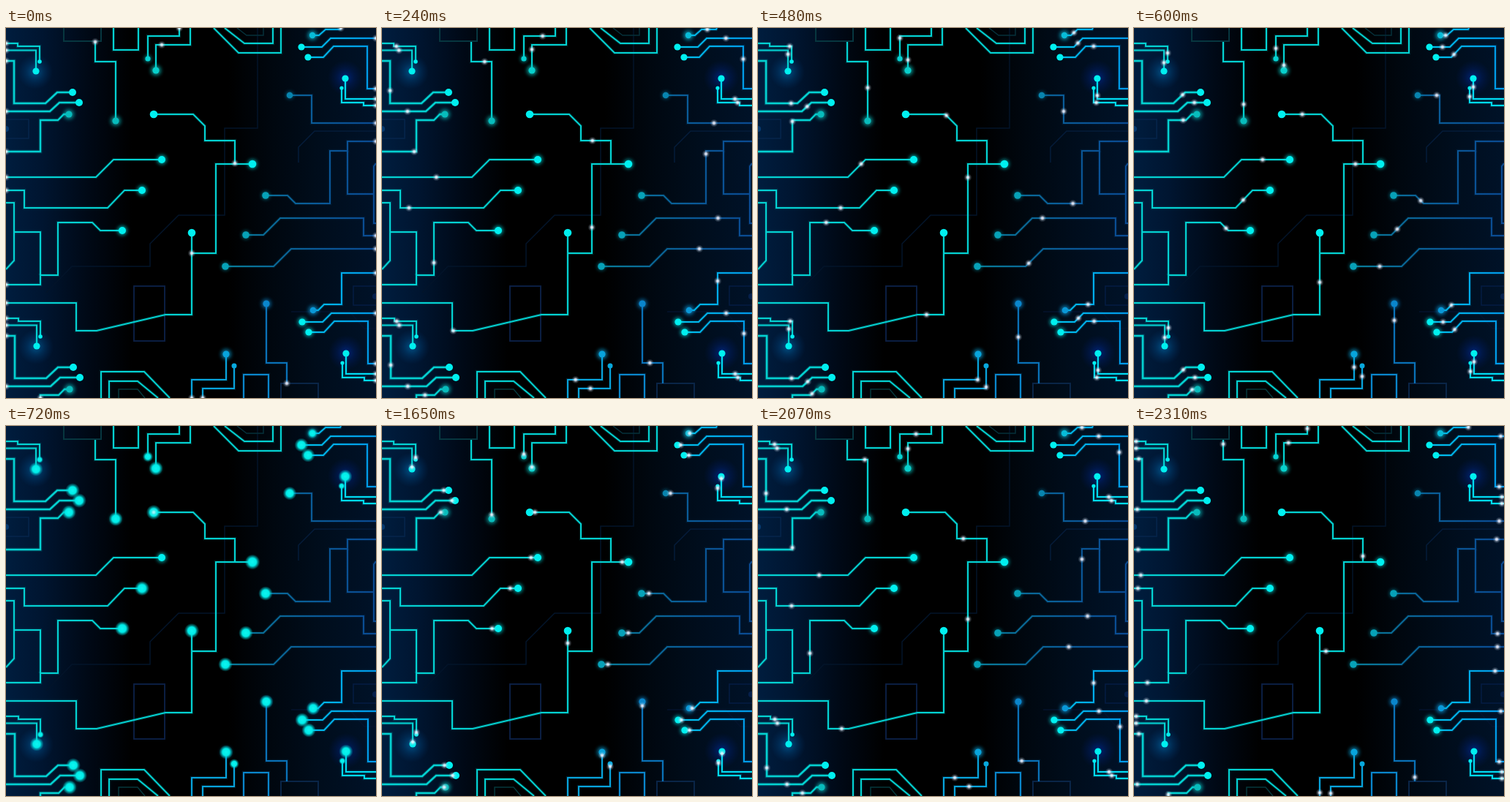
These frames come from a looping animation (506x506 px, 2.34 s). An HTML page:

```html
<!DOCTYPE html>
<html lang="en">
<head>
<meta charset="utf-8">
<title>Circuit</title>
<style>
html, body { margin: 0; width: 100%; height: 100%; overflow: hidden; background: #000; }
svg { display: block; width: 100vw; height: 100vh; }
path { fill: none; }
</style>
</head>
<body>
<svg viewBox="0 0 506 506">
  <defs>
    <linearGradient id="bg">
      <stop offset="0" stop-color="#001d3e"/>
      <stop offset=".1" stop-color="#001530"/>
      <stop offset=".22" stop-color="#000916"/>
      <stop offset=".34" stop-color="#000"/>
      <stop offset=".6" stop-color="#000"/>
      <stop offset=".72" stop-color="#00070f"/>
      <stop offset=".85" stop-color="#000d1c"/>
      <stop offset="1" stop-color="#001228"/>
    </linearGradient>
    <linearGradient id="dim" gradientUnits="userSpaceOnUse" x1="300" x2="506">
      <stop offset="0" stop-color="#087c98"/>
      <stop offset=".6" stop-color="#0a5a98"/>
      <stop offset="1" stop-color="#0a4a92"/>
    </linearGradient>
    <linearGradient id="sky" gradientUnits="userSpaceOnUse" x1="405" x2="506">
      <stop offset="0" stop-color="#00c4ee"/>
      <stop offset="1" stop-color="#0098ea"/>
    </linearGradient>
    <radialGradient id="spark">
      <stop offset="0" stop-color="#fff" stop-opacity=".95"/>
      <stop offset=".3" stop-color="#eef" stop-opacity=".75"/>
      <stop offset=".6" stop-color="#cde" stop-opacity=".28"/>
      <stop offset="1" stop-color="#cde" stop-opacity="0"/>
    </radialGradient>
    <radialGradient id="flare">
      <stop offset="0" stop-color="#10f4f0"/>
      <stop offset=".5" stop-color="#00ece8"/>
      <stop offset=".72" stop-color="#00d8d8" stop-opacity=".5"/>
      <stop offset="1" stop-color="#00c8d0" stop-opacity="0"/>
    </radialGradient>
    <radialGradient id="aura">
      <stop offset="0" stop-color="#0af" stop-opacity=".42"/>
      <stop offset=".5" stop-color="#07c" stop-opacity=".2"/>
      <stop offset="1" stop-color="#05a" stop-opacity="0"/>
    </radialGradient>
    <radialGradient id="auraBlue">
      <stop offset="0" stop-color="#04f" stop-opacity=".4"/>
      <stop offset=".5" stop-color="#03c" stop-opacity=".18"/>
      <stop offset="1" stop-color="#02a" stop-opacity="0"/>
    </radialGradient>
    <filter id="blur" x="-1" y="-1" width="3" height="3"><feGaussianBlur stdDeviation="2.6"/></filter>
  </defs>
  <rect width="506" height="506" fill="url(#bg)"/>
  <g id="base"></g><g id="nodes"></g><g id="flares"></g><g id="sparks"></g>
</svg>
<script>
const CYAN = '#04d2d2', AQUA = '#00f0f0', SKY = 'url(#sky)', DIM = 'url(#dim)', BLUE = '#0a86cc';
const layer = id => document.getElementById(id);
const base = layer('base'), nodes = layer('nodes'), flares = layer('flares'), sparks = layer('sparks');
const movers = [];

function add(parent, tag, attrs) {
  const el = document.createElementNS('http://www.w3.org/2000/svg', tag);
  for (const key in attrs) el.setAttribute(key, attrs[key]);
  return parent.appendChild(el);
}
const dot = (parent, cx, cy, r, fill, more) => add(parent, 'circle', { cx, cy, r, fill, ...more });

function line(d, stroke = CYAN, width = 2) {
  add(base, 'path', { d, stroke, 'stroke-width': width + 2.5, 'stroke-opacity': .16 });
  return add(base, 'path', { d, stroke, 'stroke-width': width });
}
const faint = (d, stroke, width = 1.5) => add(base, 'path', { d, stroke, 'stroke-width': width });

// A line ending in a node, with a spark that runs along it; ease bends its speed.
function wire(d, { color = CYAN, width = 2, node = AQUA, r = 5, glow = 0, ease = 1, flare = r + 5 } = {}) {
  const path = line(d, color, width), len = path.getTotalLength();
  const { x, y } = path.getPointAtLength(len);
  if (glow) dot(nodes, x, y, r + glow, node, { filter: 'url(#blur)', opacity: .65 });
  dot(nodes, x, y, r, node);
  if (flare) dot(flares, x, y, flare, 'url(#flare)');
  movers.push({ path, len, ease, el: dot(sparks, 0, 0, 5.5, 'url(#spark)') });
}

// Soft lights and background circuitry
for (const [x, y, fill] of [[40, 60, 'aura'], [41, 436, 'aura'], [464, 68, 'auraBlue'], [465, 444, 'auraBlue']])
  dot(base, x, y, 24, `url(#${fill})`);
faint('M344 0V137H299V256H236L197 295V326H90L55 362', '#03142a');
faint('M175 353H217V428H175Z', '#0b1e42', 2);
faint('M79 0V18H130V0', '#07363f', 2);
faint('M0 125H31V151H0', '#06264c');
faint('M506 141H422L400 163V184', '#051c3a');
faint('M506 353H475V379H506', '#051c44');
faint('M390 388H470L490 411H506', '#04132c');
faint('M376 506V486H427V506', '#0a2547', 2);
faint('M316 0L329 10H352V0', '#06303a');
faint('M154 506V494H180L190 506', '#06383c');
dot(base, 0, 138, 4, '#063a70');
dot(base, 505, 367, 4, '#06204c');

// Lines without sparks
line('M147 0V30H181V0');
line('M284 0L318 34H376V0');
line('M299 0L326 21H365V0');
line('M252 0V23H213');
line('M130 506V470H189L224 506');
line('M141 506V483H180L208 506');
line('M325 506V474H359V506', BLUE);
line('M0 239H11V318L0 330');
line('M11 279H47V338');
line('M467 168V227H503', DIM);
line('M506 185L503 189V267H506', DIM);

// Corner bundles, repeated lower down with a small shift
for (const [a, b] of [[0, 0], [1, 376]]) {
  const shift = (x, y, rest) => `M${x} ${y + b}` +
    rest.replace(/([HVL])(\d+)(?: (\d+))?/g, (m, c, p, q) =>
      c == 'V' ? 'V' + (+p + b) : c + (+p + a) + (q ? ' ' + (+q + b) : ''));
  wire(shift(0, 21, 'H16V25H46V46'), { r: 2.8, flare: 5 });
  wire(shift(0, 30.5, 'H41V59'), { r: 4.6 });
  wire(shift(0, 45, 'H11V103H54L70 88H91'), { width: 2.6 });
  wire(shift(0, 114, 'H60L73 102H100'), { width: 2.6 });
  wire(shift(506, 14, 'H444L432 26H404'), { color: SKY, r: 4.6, glow: b ? 1.5 : 0 });
  wire(shift(506, 83, 'H494V25H448L434 40H413'), { color: SKY, r: 4.6, glow: b ? 1.5 : 0 });
  wire(shift(506, 97, 'H464V69'), { color: '#00dcf4', r: 4.6 });
  wire(shift(506, 106, 'H489V102H459V82'), { color: '#00dcf4', r: 2.6, flare: 5 });
}

// Left
const soft = { node: '#08bcbc', r: 4.6, glow: 2.5 };
const lit = { glow: 1.5 };
wire('M0 169H47V126H71L79 118H86', { ...soft, width: 2.4 });
wire('M47 506V502H72L80 494H87', { ...soft, width: 2.4 });
wire('M0 204H123L147 180H213', { ...lit, flare: 0 });
wire('M0 222H25V246H139L162 222H186', { ...lit, ease: 1.17 });
wire('M0 351H47V338H71V266H118L129 277H159', { ...lit, ease: .82 });
wire('M0 376H96V414H124L218 392H254V280', { r: 5.3 });

// Middle
wire('M254 308H287V186H337', { r: 5.3, glow: 1 });
wire('M313 185V154H272V134L256 118H202', { r: 5.3 });
wire('M122 19V46H150V127', soft);
wire('M237 0V11H194V42', { r: 3.6, flare: 7, node: '#06d2d2', glow: 1 });
wire('M213 23H205V58', { ...soft, node: '#08d0cc' });
wire('M254 506V481H301V446', { color: '#08a4dc', node: '#08a4dc', r: 4.6, glow: 2.5 });
wire('M269 506V493H312V462', { color: '#08a4dc', node: '#08a8dc', r: 3.5, flare: 7 });
wire('M384 486V458H356V377', { color: '#0a72b8', node: '#0a86cc', r: 4.6, glow: 2 });

// Right
const dull = { color: DIM, node: '#07a2b8', r: 4.8, glow: .6 };
wire('M458 0L457 2H437L428 10H419', { color: SKY, node: '#08bcd8', r: 4.2, glow: 2.5, flare: 7 });
wire('M506 130H418V92H388', { ...dull, node: '#0884ae', r: 4.3 });
wire('M506 155H467V168H443V240H396L385 229H355', dull);
wire('M506 284H489V260H375L352 283H328', dull);
wire('M506 302H390L366 326H300', dull);
wire('M506 335H459V378H435L427 386H420', { color: SKY, node: '#0a98d8', r: 4.3, glow: 2.5, ease: .75 });

// The spark resting on the top middle node during the pause
const rest = dot(flares, 202, 118, 5.5, 'url(#spark)', { opacity: .7 });

const LOOP = 2340, RUN = 720, BACK = 1650, STEP = 30;

function draw(now) {
  const t = Math.floor(now % LOOP / STEP) * STEP;
  const paused = t >= RUN && t < BACK;
  flares.style.display = paused ? '' : 'none';
  sparks.style.display = paused ? 'none' : '';
  const p = Math.min(t, LOOP - t, RUN) / RUN;
  for (const { path, len, ease, el } of movers) {
    const { x, y } = path.getPointAtLength(len * p ** ease);
    el.setAttribute('cx', x);
    el.setAttribute('cy', y);
  }
}

let start;
function tick(now) {
  start ??= now;
  draw(now - start);
  requestAnimationFrame(tick);
}
draw(0);
requestAnimationFrame(tick);
</script>
</body>
</html>
```
